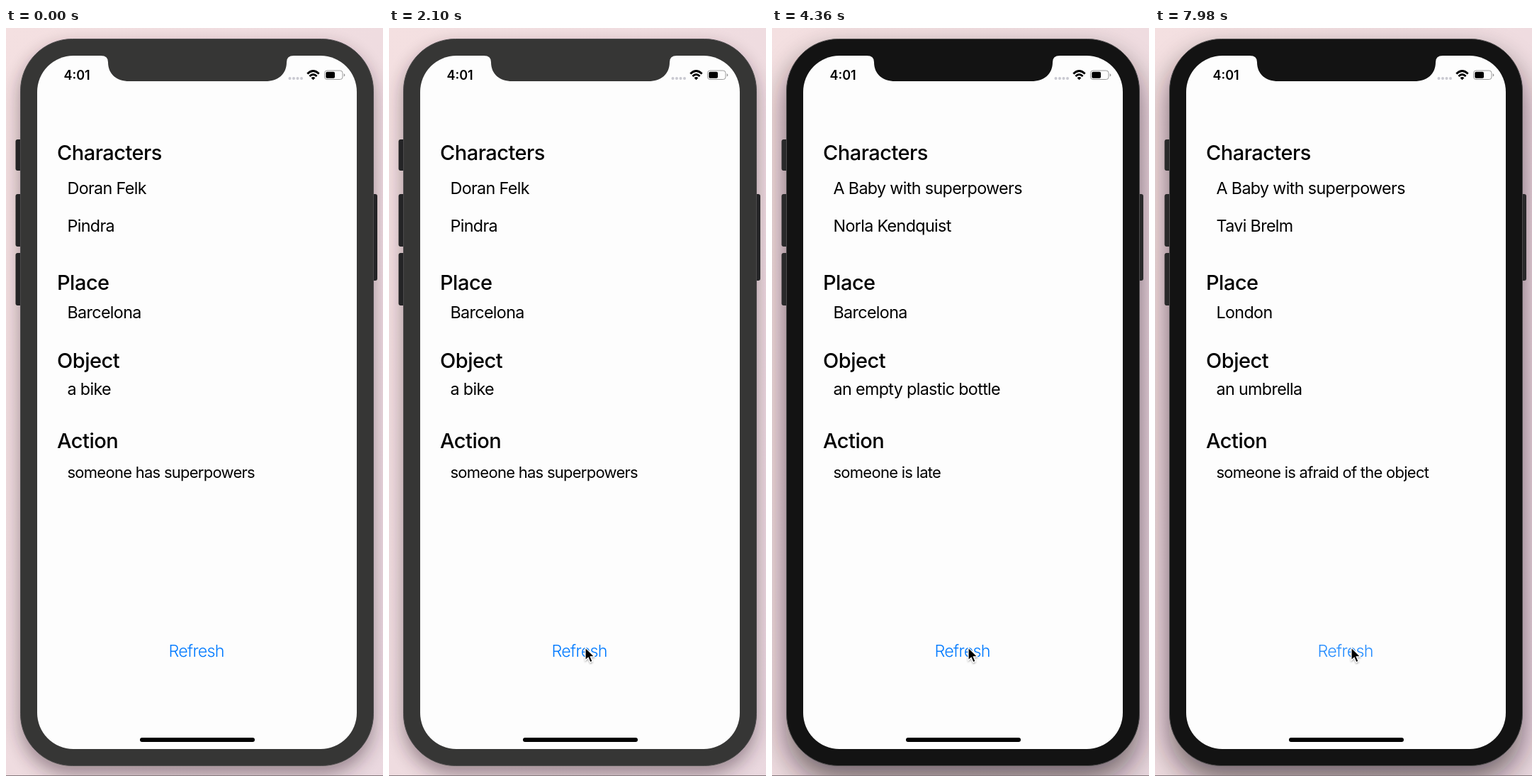
An HTML page for the animation above (8 s loop, 532x1054 px).

```html
<!DOCTYPE html>
<html lang="en">
<head>
<meta charset="utf-8">
<title>Story prompts</title>
<style>
  html, body { margin: 0; width: 100%; height: 100%; overflow: hidden; background: #f2dfe1; }
  svg { display: block; width: 532px; height: 1054px; }
  text { font-family: Inter, "Liberation Sans", sans-serif; font-optical-sizing: none; fill: #000; }
  .head { font-size: 29px; font-weight: 500; letter-spacing: -.5px; }
  .item { font-size: 23.3px; letter-spacing: -.65px; }
  .small { font-size: 22px; letter-spacing: -.74px; }
  .clock { font-size: 18px; font-weight: 600; }
  .button { font-size: 23.3px; font-weight: 300; letter-spacing: -.7px; fill: #007aff; }
</style>
</head>
<body>
<svg viewBox="0 0 532 1054">
  <defs>
    <linearGradient id="wall" x2="1" y2="1">
      <stop offset="0" stop-color="#f4e0e1"/>
      <stop offset="1" stop-color="#ead8df"/>
    </linearGradient>
    <filter id="soft" x="-20%" y="-10%" width="140%" height="120%"><feGaussianBlur stdDeviation="13"/></filter>
    <filter id="wide" x="-25%" y="-15%" width="150%" height="130%"><feGaussianBlur stdDeviation="21"/></filter>
    <filter id="lift" x="-50%" y="-50%" width="200%" height="200%">
      <feDropShadow dx="0" dy="1.5" stdDeviation="1.2" flood-opacity=".35"/>
    </filter>
  </defs>

  <rect width="532" height="1054" fill="url(#wall)"/>
  <rect id="idleShadow" x="20" y="27" width="498" height="1025" rx="72" fill="#2a1624" opacity=".42" filter="url(#soft)"/>
  <rect id="activeShadow" x="20" y="36" width="498" height="1025" rx="72" fill="#1c1018" opacity=".58" filter="url(#wide)"/>
  <rect y="1053" width="532" height="1" fill="#85797d"/>

  <g id="keys">
    <rect x="13.5" y="157" width="12" height="44" rx="3"/>
    <rect x="13.5" y="234" width="12" height="74" rx="3"/>
    <rect x="13.5" y="317" width="12" height="74" rx="3"/>
    <rect x="512" y="234" width="12" height="122" rx="3"/>
  </g>
  <rect id="body" x="20.5" y="15.5" width="498" height="1024" rx="73" stroke="#4c4b4c"/>
  <rect x="44" y="39" width="451" height="977" rx="51" fill="#fdfdfd"/>
  <path id="notch" d="M134 38V39Q144 39 144 48C144 65 156 75 174 75H366C384 75 396 65 396 48Q396 39 406 39V38Z"/>

  <text class="clock" x="81.5" y="73">4:01</text>
  <g fill="#c9c9d1">
    <circle cx="400.5" cy="71" r="2"/><circle cx="406" cy="71" r="2"/>
    <circle cx="411.5" cy="71" r="2"/><circle cx="417" cy="71" r="2"/>
  </g>
  <g fill="none" stroke="#000" stroke-width="2.7">
    <path d="M425.3 64.5Q433.5 56.5 441.7 64.5M428.4 68Q433.5 63 438.6 68"/>
    <path d="M433.5 73.3L430.6 70.3Q433.5 67.8 436.4 70.3Z" fill="#000" stroke="none"/>
  </g>
  <rect x="449.5" y="60" width="25.5" height="12.5" rx="3.5" fill="none" stroke="#9b9b9b"/>
  <rect x="451.3" y="61.8" width="12.7" height="9" rx="1.8"/>
  <path d="M476.8 64Q480 66.3 476.8 68.6Z" fill="#8f8f8f"/>

  <g id="labels"></g>
  <text class="button" id="refresh" x="229.5" y="886">Refresh</text>
  <rect x="189" y="1000" width="162" height="6" rx="3"/>

  <path id="cursor" d="M0 0V18L4.1 14.2L6.9 20.8L10.1 19.4L7.3 12.9H12.8Z" stroke="#fff" stroke-width="1.2" filter="url(#lift)"/>
</svg>
<script>
const LOOP = 8000, FADE = 470;
const byId = id => document.getElementById(id);

const headings = [["Characters", 185.5], ["Place", 368.5], ["Object", 479], ["Action", 592]];
const rows = [234, 287, 409, 517, 634];
const prompts = [
  ["Doran Felk", "Pindra", "Barcelona", "a bike", "someone has superpowers"],
  ["A Baby with superpowers", "Norla Kendquist", "Barcelona", "an empty plastic bottle", "someone is late"],
  ["A Baby with superpowers", "Tavi Brelm", "London", "an umbrella", "someone is afraid of the object"]
];
const clicks = [{ down: 3220, up: 3320 }, { down: 7420, up: 7600 }];
// time, x, y
const path = [[760, 545, 640], [1240, 291, 859], [1700, 277, 873]];

function addText(cls, x, y, value = "") {
  const el = document.createElementNS("http://www.w3.org/2000/svg", "text");
  el.setAttribute("class", cls);
  el.setAttribute("x", x);
  el.setAttribute("y", y);
  el.textContent = value;
  return byId("labels").appendChild(el);
}
headings.forEach(([name, y]) => addText("head", 72, y, name));
const items = rows.map((y, i) => addText(i === 4 ? "small" : "item", 86.5, y));

function buttonAlpha(t) {
  const click = clicks.filter(c => t >= c.down).pop();
  if (!click) return 1;
  const p = Math.min(1, Math.max(0, (t - click.up) / FADE));
  return .2 + .8 * p;
}

function cursorAt(t) {
  const next = path.findIndex(k => k[0] > t);
  if (next < 0) return path[path.length - 1].slice(1);
  if (next === 0) return null;
  const [t0, x0, y0] = path[next - 1], [t1, x1, y1] = path[next];
  const p = (t - t0) / (t1 - t0), e = 1 - (1 - p) ** 2;
  return [x0 + (x1 - x0) * e, y0 + (y1 - y0) * e];
}

let shown = -1;
function draw(t) {
  const set = clicks.filter(c => t >= c.up).length;
  if (set !== shown) {
    items.forEach((el, i) => el.textContent = prompts[set][i]);
    shown = set;
  }
  // The first press brings the window to the front.
  const active = t >= clicks[0].down;
  const shell = active ? "#131313" : "#363635";
  byId("body").style.fill = shell;
  byId("notch").style.fill = shell;
  byId("keys").style.fill = active ? "#29292a" : "#242426";
  byId("idleShadow").style.display = active ? "none" : "";
  byId("activeShadow").style.display = active ? "" : "none";
  byId("refresh").style.opacity = buttonAlpha(t);

  const pos = cursorAt(t);
  byId("cursor").style.display = pos ? "" : "none";
  if (pos) byId("cursor").setAttribute("transform", `translate(${pos[0]} ${pos[1]})`);
}

const start = performance.now();
function tick() {
  draw((performance.now() - start) % LOOP);
  requestAnimationFrame(tick);
}
tick();
</script>
</body>
</html>
```
